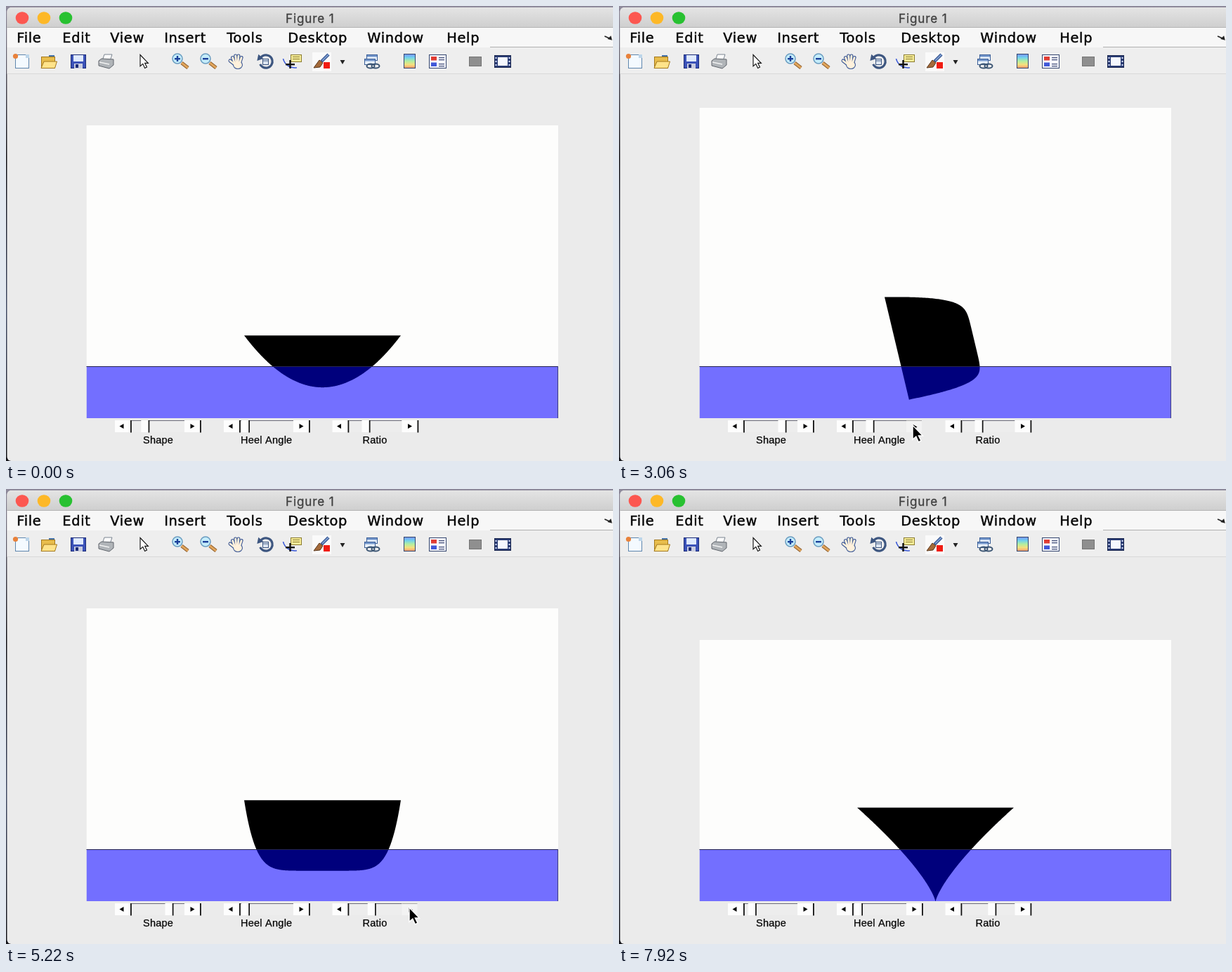
An HTML page with a canvas for the animation above (7.95 s loop, 864 by 648 pixels).

```html
<!DOCTYPE html>
<html lang="en">
<head>
<meta charset="utf-8">
<title>Figure 1</title>
<style>
html, body { margin: 0; width: 100%; height: 100%; overflow: hidden; background: #ebebeb; }
canvas { display: block; width: 864px; height: 648px; }
</style>
</head>
<body>
<canvas id="stage" width="864" height="648"></canvas>
<script>
const g = document.getElementById('stage').getContext('2d');
const LOOP = 7950, W = 864, H = 648;
const plotX = 114.5, plotW = 671.5, sea = 513, seaDepth = 74;
const midX = 450.5, unitX = 111.5, unitY = 74, waterline = sea + .8;

// ---------- drawing helpers ----------
function rect(x, y, w, h, fill) { g.fillStyle = fill; g.fillRect(x, y, w, h); }
function box(x, y, w, h, fill, line) { rect(x, y, w, h, line); rect(x + 1, y + 1, w - 2, h - 2, fill); }
function trace(pts) {
  g.beginPath();
  for (const [x, y] of pts) g.lineTo(x, y);
}
function poly(pts, fill, line, width = 1) {
  trace(pts); g.closePath();
  g.fillStyle = fill; g.fill();
  if (line) { g.strokeStyle = line; g.lineWidth = width; g.stroke(); }
}
function line(x0, y0, x1, y1, color, width) {
  trace([[x0, y0], [x1, y1]]);
  g.strokeStyle = color; g.lineWidth = width; g.stroke();
}
function oval(x, y, rx, ry, fill, edge, width = 1) {
  g.beginPath(); g.ellipse(x, y, rx, ry, 0, 0, 7);
  if (fill) { g.fillStyle = fill; g.fill(); }
  if (edge) { g.strokeStyle = edge; g.lineWidth = width; g.stroke(); }
}
function triangle(x, y, r, turn, fill) {
  poly([0, 1, 2].map(i => turn + i * Math.PI * 2 / 3).map(a => [x + r * Math.cos(a), y + r * Math.sin(a)]), fill);
}
function fade(x0, y0, x1, y1, colors) {
  const f = g.createLinearGradient(x0, y0, x1, y1);
  colors.forEach((c, i) => f.addColorStop(i / (colors.length - 1), c));
  return f;
}
function text(str, x, y, font, color, gap, weight) {
  g.font = font; g.letterSpacing = gap + 'px';
  g.fillStyle = g.strokeStyle = color; g.lineWidth = weight;
  g.fillText(str, x, y); g.strokeText(str, x, y);
}
function at(x, y, paint) { g.save(); g.translate(x, y); paint(); g.restore(); }
function arrow(x, y, k, fill, edge) {
  at(x, y, () => {
    g.scale(k, k);
    poly([[0, 0], [0, 17], [4, 13.5], [7, 20], [10, 18.5], [7, 12.5], [12, 12.5]], fill, edge, 1.2);
  });
}

// ---------- toolbar icons, each around its own centre ----------
function page() {
  box(-9, -10, 20, 20, '#f4faff', '#5f86ad');
  rect(6, -10, 5, 5, '#bcd5ea');
  oval(-8.5, -7.5, 3.6, 3.6, '#e8813a');
}
function folder() {
  box(-11, -7, 20, 17, '#e8bd4c', '#a3781c');
  poly([[-11, 9.5], [-7, 0], [11.5, 0], [8.5, 9.5]], '#ffe38a', '#a3781c');
  line(0, -8, 8, -8, '#4673a8', 2);
}
function disk() {
  box(-11, -10, 22, 20, '#3b52b8', '#1c2c78');
  rect(-7, -9, 14, 9, '#dfeaff');
  rect(-6, 3, 12, 7, '#c9cde0');
  rect(-4, 4, 4, 5, '#1c2c78');
}
function printer() {
  poly([[-5, -1], [-2, -10], [9, -10], [6, -1]], '#fdfdfd', '#7b8490');
  poly([[-10, -1], [-6, -4], [11, -3], [11, 5], [5, 10], [-10, 6]], '#b0b4b8', '#60656c');
  line(-9, 1, 5, 4, '#f2f2f2', 1.5);
}
function magnifier(plus) {
  line(2, 2, 11, 9, '#8a5a2a', 5);
  line(2, 2, 11, 9, '#e0a55c', 3);
  oval(-4, -4, 7, 7, '#c4ecfa', '#6a9cc0', 1.5);
  rect(-8, -5, 8, 2.4, '#1a3f9a');
  if (plus) rect(-5.2, -8, 2.4, 8, '#1a3f9a');
}
function hand() {
  g.lineCap = 'round';
  for (const [edge, width] of [['#3a5795', 5], ['#fff1dc', 2.8]]) {
    for (let i = 0; i < 4; i++) line(i * 2 - 2, 4, i * 4.2 - 5.5, i % 3 ? -8 : -5.5, edge, width);
    line(0, 6, -9, -1, edge, width);
    oval(2, 5, 5, 4, edge, edge, width - 1);
  }
}
function turntable() {
  g.beginPath(); g.arc(1, 0, 9.2, -2.6, 2.7);
  g.strokeStyle = '#3d5680'; g.lineWidth = 3.2; g.stroke();
  triangle(-8, -5, 5.5, 2.3, '#3d5680');
  box(-4, -4, 9, 9, '#dde6f2', '#3d5680');
  line(-4, -1, 5, -1, '#3d5680', 1);
}
function dataTip() {
  g.beginPath(); g.arc(2, -8, 17, 1.4, 2.9);
  g.strokeStyle = '#3858d8'; g.lineWidth = 1.6; g.stroke();
  box(-4, -10, 16, 11, '#f6ec98', '#8a7c30');
  for (const y of [-7, -4]) rect(-1, y, 10, 1, '#8a7c30');
  rect(-11, 3, 13, 2.4, '#111');
  rect(-5.7, -2, 2.4, 12, '#111');
}
function brush() {
  rect(-13, -13, 27, 27, '#fafafa');
  line(10, -10, 0, 0, '#34538e', 4.5);
  line(10, -10, 1, -1, '#7e9ed0', 1.8);
  poly([[-3, -2], [2, 2], [-2, 8], [-11, 9]], '#a46a3a', '#5a381c');
  rect(3, 1, 9, 9, '#f01c12');
}
function linked() {
  for (const s of [0, 1]) {
    box(-8 - s * 3, -10 + s * 6, 16, 9, '#eaf2fb', '#3b5f98');
    rect(-7 - s * 3, -9 + s * 6, 14, 2.5, '#7295ca');
  }
  for (const x of [-2, 5]) oval(x, 6.5, 5.5, 3, null, '#3b5573', 2);
}
function colorbar() {
  box(-8, -11, 17, 21, fade(0, -11, 0, 10, ['#7b8cf0', '#6fd0f0', '#b2eea0', '#f8df7c', '#ef8a6a']), '#33476e');
}
function legend() {
  box(-12, -10, 25, 20, '#f8f9ff', '#34456e');
  ['#e03c34', '#4058d8'].forEach((c, i) => {
    rect(-9, -7 + i * 8.5, 8, 5.5, c);
    for (const y of [-6, -3]) rect(2, y + i * 9, 8, 1.3, '#444f78');
  });
}
function film() {
  box(-12, -9, 24, 18, '#2a3c74', '#1b2850');
  rect(-7, -6, 14, 12, '#f5f8ff');
  for (let y = -6; y < 6; y += 5) for (const x of [-10.5, 8.5]) rect(x, y, 2, 2, '#dce4ff');
}
const tools = [
  [22, page], [61, folder], [103, disk], [142, printer], [191, () => arrow(0, -9.5, .95, '#fff', '#111')],
  [248, () => magnifier(true)], [288, () => magnifier(false)], [328, hand], [369, turntable], [409, dataTip],
  [449, brush], [479, () => triangle(0, 0, 4, Math.PI / 2, '#222')], [521, linked], [574, colorbar],
  [614, legend], [668, () => box(-9, -7, 18, 14, '#8f8f8f', '#737373')], [707, film]
];
const menu = { File: 16, Edit: 81, View: 149, Insert: 226, Tools: 315, Desktop: 402, Window: 515, Help: 628 };

function figureWindow() {
  rect(0, 0, W, H, fade(0, 0, 0, H, ['#8f8b9c', '#14141a', '#46506a', '#15151a']));
  g.save();
  g.beginPath(); g.roundRect(1.5, 2, W + 20, H - 2, 6); g.clip();
  rect(0, 0, W, H, '#ebebeb');
  rect(0, 2, W, 29, fade(0, 2, 0, 31, ['#e4e4e4', '#cecece']));
  rect(0, 30, W, 1, '#b4b4b4');
  rect(0, 31, W, 28, '#f7f7f7');
  rect(0, 59, W, 37, '#eeeeee');
  rect(689, 58, W, 1, '#b0b0b0');
  rect(0, 96, W, 1, '#d9d9d9');
  g.restore();

  ['#fc5750', '#fdb827', '#28c131'].forEach((c, i) => oval(23 + i * 31, 17, 9.3, 8.8, c));
  text('Figure 1', 398, 23.5, '17px Inter, "Liberation Sans", sans-serif', '#404040', .9, .3);
  for (const name in menu)
    text(name, menu[name] - .8, 52, '19.4px "DejaVu Sans", sans-serif', '#050505', .7, .45);
  line(852, 43, 859, 46, '#222', 1.5);
  triangle(860, 46, 4, .8, '#222');
  for (const [x, icon] of tools) at(x, 79, icon);
}

// ---------- motion: everything follows from which button is held when ----------
const sliders = [
  { label: 'Shape', x: 155, textX: 195, value: 2, speed: 4.37, thumb: 203.3, scale: 6.8 },
  { label: 'Heel Angle', x: 310, textX: 334, value: 0, speed: 193.7, thumb: 346, scale: 1 / 6 },
  { label: 'Ratio', x: 464.5, textX: 507.5, value: 1, speed: 1.7, thumb: 517.5, scale: 23 }
];
const holds = [
  { id: 0, dir: 1, from: 960, to: 2110, x: 261, y: 600 },
  { id: 1, dir: 1, from: 2550, to: 3500, x: 418, y: 597 },
  { id: 1, dir: -1, from: 3750, to: 4700, x: 324, y: 590 },
  { id: 2, dir: 1, from: 5010, to: 5490, x: 574, y: 596 },
  { id: 0, dir: -1, from: 5810, to: 7247, x: 176, y: 591 }
];
const offstage = { x: 240, y: 664 };
const stops = [{ ...offstage, to: 520 }, ...holds, { ...offstage, from: 7560, to: 7560 }];

const clamp = (v, lo, hi) => Math.min(hi, Math.max(lo, v));
const easeOut = u => 1 - (1 - u) ** 2;
const pressed = (id, dir, t) => holds.some(h => h.id === id && h.dir === dir && t >= h.from && t < h.to);

function valueAt(id, t) {
  const s = sliders[id];
  return holds.filter(h => h.id === id).reduce(
    (v, h) => v + h.dir * s.speed * (clamp(t, h.from, h.to) - h.from) / 1000, s.value);
}
function pointer(t) {
  const i = stops.findIndex(s => t < s.to);
  if (i < 1) return;
  const a = stops[i - 1], b = stops[i];
  const u = easeOut(clamp((t - a.to) / (b.from - a.to), 0, 1));
  arrow(a.x + (b.x - a.x) * u, a.y + (b.y - a.y) * u, 1.2, '#000', '#fff');
}

// Hull outline about its mid-height, heeled, in world units with y up.
function hull(n, heel, h) {
  const c = Math.cos(heel), s = Math.sin(heel), pts = [], N = 200;
  const add = (x, y) => pts.push([x * c - y * s, x * s + y * c]);
  for (let i = -N; i <= N; i++) add(i / N, h * Math.abs(i / N) ** n - h / 2);
  for (let i = N - 1; i > -N; i--) add(i / N, h / 2);
  return pts;
}
function wetArea(pts, lift) {
  let sum = 0, [px, py] = pts[pts.length - 1];
  py = Math.min(0, py + lift);
  for (const [x, y0] of pts) {
    const y = Math.min(0, y0 + lift);
    sum += (x + px) * (y - py) / 2;
    px = x; py = y;
  }
  return sum;
}
// Lift at which a quarter of the section is under water.
function float(pts) {
  const goal = wetArea(pts, -9) / 4;
  let lo = -3, hi = 3;
  for (let i = 0; i < 24; i++) {
    const mid = (lo + hi) / 2;
    if (wetArea(pts, mid) > goal) lo = mid; else hi = mid;
  }
  return lo;
}

function plot(t) {
  const h = valueAt(2, t);
  const pts = hull(valueAt(0, t), valueAt(1, t) * Math.PI / 180, h);
  const lift = float(pts);
  const top = Math.round(waterline - (lift - h / 2 + 5.045) * unitY);
  const shape = pts.map(([x, y]) => [midX + x * unitX, waterline - (y + lift) * unitY]);
  const layer = (y, height, back, fill) => {
    g.save();
    g.beginPath(); g.rect(plotX, y, plotW, height); g.clip();
    rect(plotX, y, plotW, height, back);
    poly(shape, fill);
    g.restore();
  };
  layer(top, sea - top, '#fdfdfc', '#000');
  layer(sea, seaDepth, '#736fff', '#00007c');
  rect(plotX, sea, plotW, 1, '#26264e');
  rect(plotX + plotW - 1, sea, 1, seaDepth, '#3a3a80');
}

function button(x, dir, down) {
  rect(x, 590, 22, 17, down ? '#f3f3f3' : '#fdfdfd');
  if (down) rect(x, 590, 22, 1, '#a8a8a8');
  else rect(x + 22, 590, 1.8, 17.5, '#111');
  triangle(x + 10.5 + down, 598.5 + down, 4, dir > 0 ? 0 : Math.PI, '#000');
}
function slider(s, id, t) {
  rect(s.x + 24, 590, 75, 17, '#ededed');
  rect(s.x + 24, 590, 75, 1, '#6c6c78');
  for (const dir of [-1, 1]) button(s.x + (dir > 0 ? 99 : 0), dir, pressed(id, dir, t));
  const edge = s.thumb + (valueAt(id, t) - s.value) * s.scale;
  rect(edge - 11, 590, 10.5, 17, '#fdfdfd');
  rect(edge - .7, 590, 1.7, 17.5, '#111');
  text(s.label, s.textX, 623, '14.5px "Liberation Sans", Arial, sans-serif', '#050505', .25, .25);
}

function draw(t) {
  figureWindow();
  plot(t);
  sliders.forEach((s, id) => slider(s, id, t));
  pointer(t);
}

const start = performance.now();
function tick() {
  draw((performance.now() - start) % LOOP);
  requestAnimationFrame(tick);
}
tick();
</script>
</body>
</html>
```
